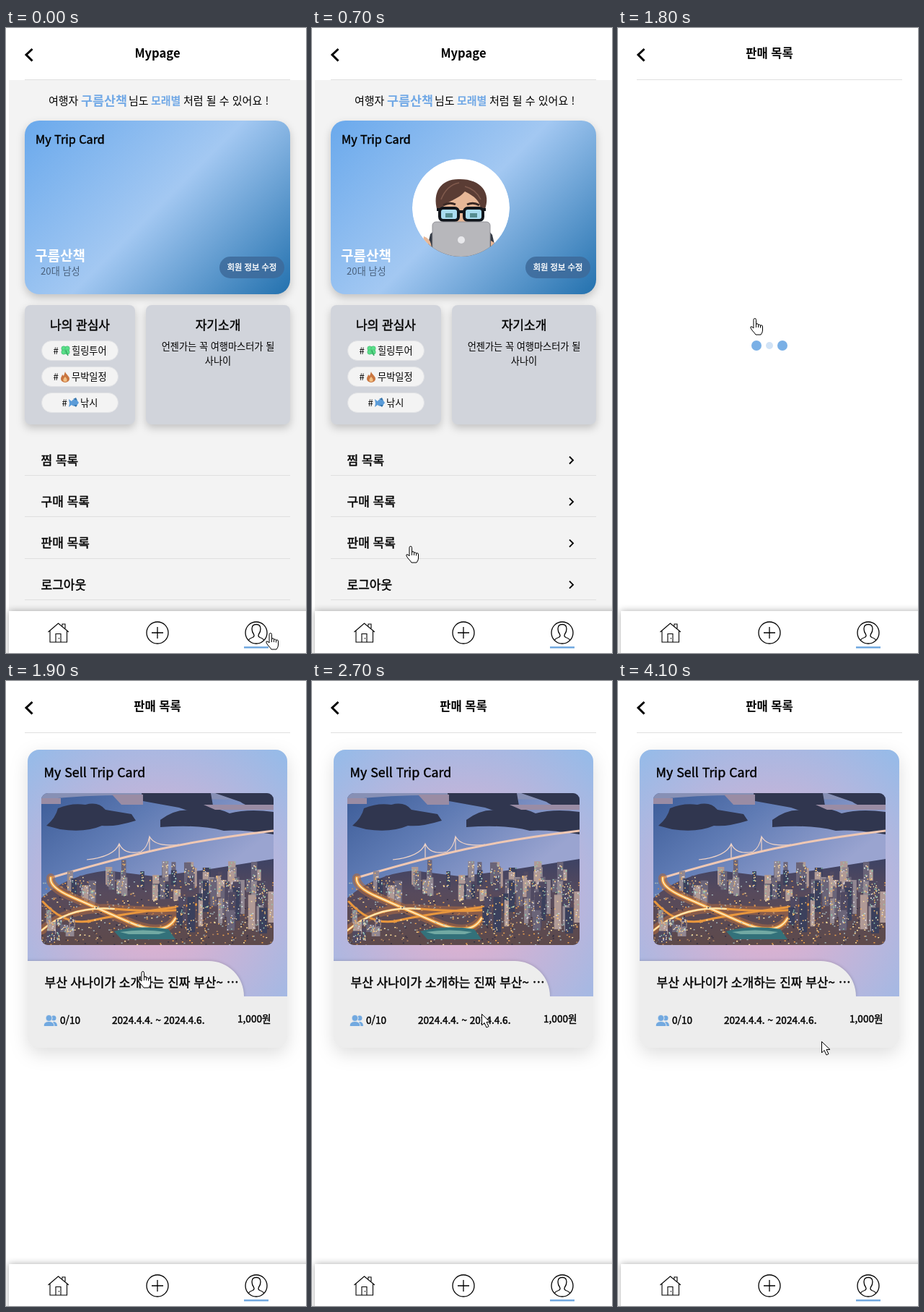
Animation, 416 px wide and 864 px high, one loop 4200 ms. Source, as an HTML page:

```html
<!DOCTYPE html>
<html lang="ko">
<head>
<meta charset="utf-8">
<title>Mypage</title>
<style>
html, body { margin: 0; height: 100%; overflow: hidden; background: #fff; }
svg { display: block; width: 416px; height: 864px; }
text { font: 400 17px "Noto Sans CJK KR", "Noto Sans KR", "Noto Sans CJK JP", sans-serif; }
.mid { text-anchor: middle; }
.medium { stroke: #000; stroke-width: .45px; }
.s13 { font-size: 13.2px; }
.s14 { font-size: 13.6px; }
.s15 { font-size: 15px; }
.blue { fill: #72a9e6; font-weight: 700; }
.line { fill: none; stroke: #000; stroke-width: 1.3; }
.shadow { filter: drop-shadow(0 5px 6px #0003); }
.soft { filter: drop-shadow(0 8px 12px #0002); }
.thin { stroke: #dfdfdf; }
</style>
</head>
<body>
<svg viewBox="0 0 416 864">
  <defs>
    <linearGradient id="trip" gradientUnits="userSpaceOnUse" x1="58" y1="96" x2="362" y2="400">
      <stop stop-color="#6aa9ec"/><stop offset=".5" stop-color="#a3c8f2"/><stop offset="1" stop-color="#2371ae"/>
    </linearGradient>
    <radialGradient id="sell" gradientUnits="userSpaceOnUse" cx="210" cy="301" r="273">
      <stop stop-color="#eeaeca"/><stop offset="1" stop-color="#94bbe9"/>
    </radialGradient>
    <linearGradient id="sea" x2=".7" y2=".6">
      <stop stop-color="#3c5c98"/><stop offset=".45" stop-color="#5f7bb4"/><stop offset="1" stop-color="#9aa4d0"/>
    </linearGradient>
    <linearGradient id="land" x2="0" y2="1">
      <stop stop-color="#3d4264"/><stop offset=".4" stop-color="#574a5c"/><stop offset="1" stop-color="#5e4a4b"/>
    </linearGradient>
    <clipPath id="face"><circle cx="206.500" cy="248.500" r="67.500"/></clipPath>
    <clipPath id="photoClip"><rect x="49" y="155" width="322" height="210" rx="9"/></clipPath>
    <clipPath id="cardClip"><rect x="30" y="95" width="360" height="412" rx="16"/></clipPath>
  </defs>

  <g id="mypage">
    <path fill="#f3f3f3" d="M4 72H416V806H4z"/>
    <text class="s15" x="59" y="106">여행자</text>
    <text class="blue" x="104" y="107" style="font-size:17.400px">구름산책</text>
    <text class="s15" x="170" y="106">님도</text>
    <text class="blue" x="201" y="106" style="font-size:15px">모래별</text>
    <text class="s15" x="246" y="106">처럼 될 수 있어요 !</text>

    <rect class="shadow" x="26" y="128" width="368" height="240" rx="20" fill="url(#trip)"/>
    <text class="medium" x="41" y="160" style="font-size:16.200px">My Trip Card</text>
    <text x="40" y="322" fill="#fff" style="font-size:19px;font-weight:700">구름산책</text>
    <text class="s13" x="48" y="341" fill="#4a617c" style="font-weight:300">20대 남성</text>
    <rect x="296" y="316" width="90" height="30" rx="15" fill="#3e6a9a" opacity=".85"/>
    <text class="mid" x="341" y="335" fill="#fff" stroke="#fff" stroke-width=".4" style="font-size:11.300px">회원 정보 수정</text>

    <g class="shadow" fill="#d1d4db">
      <rect x="26" y="383" width="153" height="165" rx="8"/>
      <rect x="194" y="383" width="200" height="165" rx="8"/>
    </g>
    <text class="mid medium" x="102.500" y="417">나의 관심사</text>
    <text class="mid medium" x="294" y="417">자기소개</text>
    <text class="s13 mid" x="294" y="445">언젠가는 꼭 여행마스터가 될</text>
    <text class="s13 mid" x="294" y="465">사나이</text>
    <g id="tags"></g>
    <g fill="#5be08a" stroke="#35a862" stroke-width=".5">
      <circle cx="80" cy="443" r="3.200"/><circle cx="85" cy="443" r="3.200"/>
      <circle cx="80" cy="448" r="3.200"/><circle cx="85" cy="448" r="3.200"/>
      <path fill="none" stroke-width="1.500" d="M83 446l3 7"/>
    </g>
    <path fill="#c9753f" d="M82 475c1 4 6 6 6 10a6 5 0 0 1-12 0c0-3 2-4 2-6l2 2z"/>
    <path fill="#f2bf83" d="M82 482c3 3 4 7 0 7s-3-4 0-7z"/>
    <path fill="#5a9bd8" d="M87 513l4 3c2-4 7-4 10 2-3 5-7 6-10 3l-4 3 1-5z"/>
    <path fill="#3474ac" d="M93 513l4-2 2 4zM94 521l3 3 2-3z"/>
    <g id="rows"></g>

    <g id="loaded">
      <g clip-path="url(#face)">
        <circle cx="206.500" cy="248.500" r="67.500" fill="#fff"/>
        <path fill="#343a45" d="M157 316l7-31q8-9 20-10h46q14 2 20 11l7 30z"/>
        <ellipse cx="207" cy="250" rx="31" ry="30" fill="#e7b797"/>
        <path fill="#5a3c34" d="M174 253c-8-26 5-44 29-44 30-1 47 18 36 44l-5-2c-1-12-8-18-22-25-10 12-25 12-33 25z"/>
        <path fill="none" stroke="#805a4d" stroke-width="1.500" d="M179 237q8-20 25-23M212 219q15 4 22 18"/>
        <path fill="none" stroke="#3b2925" stroke-width="3" d="M182 245q9-5 17-1M215 244q9-4 17 1"/>
        <g fill="#a9dcf0" stroke="#11151b" stroke-width="4">
          <rect x="177" y="249" width="26" height="17" rx="5"/><rect x="211" y="249" width="26" height="17" rx="5"/>
          <path d="M202 254h9M173 251h4M237 251h4"/>
        </g>
        <path fill="#568d91" d="M185 256h10v6h-10zM219 256h10v6h-10z"/>
        <rect x="167" y="268" width="80" height="54" rx="5" fill="#b7b7bb" stroke="#929298"/>
        <circle cx="207" cy="293" r="5" fill="#e8e8eb"/>
        <path fill="#e7b797" d="M155 288q10 3 11 16l-3 13h-12zM248 294q8 3 8 15l-8 7z"/>
      </g>
      <g id="chevrons" class="line" style="stroke-width:1.900px"></g>
    </g>
  </g>

  <g id="empty">
    <text class="mid" x="210" y="438">판매 목록에 아무것도 없어요..</text>
    <text x="41" y="464">같이 여행을 떠날 동행 메이트를 모집해보세요</text>
    <circle cx="367.500" cy="459" r="9" fill="#efb35e"/>
    <path fill="#fff" stroke="#75452a" d="M361 459h13q-1 7-6.500 7t-6.500-7z"/>
    <path class="line" style="stroke:#75452a" d="M361 456q2-3 4 0M370 456q2-3 4 0M362 462h11"/>
  </g>

  <g id="loader" fill="#7ab0e6"></g>

  <g id="card">
    <rect class="soft" x="30" y="95" width="360" height="412" rx="16" fill="#ededed"/>
    <g clip-path="url(#cardClip)">
      <path fill="url(#sell)" d="M30 95H390V436H30z"/>
      <path fill="#ededed" style="filter:drop-shadow(0 0 2px #0003)" d="M20 387H281A49 49 0 0 1 330 436H20z"/>
      <path fill="#ededed" d="M30 436H390V507H30z"/>
    </g>
    <text class="medium" x="52.500" y="133" style="font-size:17.800px">My Sell Trip Card</text>
    <g id="photo" clip-path="url(#photoClip)">
      <path fill="url(#sea)" d="M49 155H371V365H49z"/>
      <path fill="#8790b5" d="M49 155H371V163Q290 166 220 160T49 164z"/>
      <path fill="#30364f" d="M188 155H284L288 178Q262 184 240 175L190 166zM56 200Q69 189 72 176 91 168 110 171 128 166 138 178L174 184 180 193Q151 202 133 200 110 210 75 205zM214 192Q238 174 262 180 287 171 310 183 336 176 371 181V212Q325 205 302 207 269 198 214 202zM290 155H371V176Q336 176 325 167z"/>
      <path fill="#9a8ca4" d="M49 162H76V170H49zM147 157H190V171H160zM274 171H371V178H290z"/>
      <path fill="none" stroke="#f3d5c6" stroke-width="1.200" d="M112 247Q150 243 157 225 164 241 187 236 196 231 199 215 207 230 240 226M157 225v19M199 215v20"/>
      <path fill="none" stroke="#efc8b4" stroke-width="3" d="M371 207Q280 218 215 232T62 272"/>
      <path fill="url(#land)" d="M49 300Q85 268 140 262L205 270 270 262 371 246V365H49z"/>
      <g id="far"></g>
      <g fill="none" stroke="#e9973d" stroke-linecap="round">
        <path stroke="#a96a45" stroke-width="12" opacity=".6" d="M62 272Q60 285 90 298T170 333 235 328M49 345Q90 310 150 315T244 316"/>
        <path stroke-width="5" d="M62 272Q60 285 90 298T170 333 235 328"/>
        <path stroke-width="3" d="M49 345Q90 310 150 315T244 316M51 305Q83 340 120 331T280 307"/>
        <path stroke="#ffe6b0" stroke-width="2" d="M62 272Q60 285 90 298T170 333 235 328M49 345Q90 310 150 315"/>
      </g>
      <g id="near"></g>
      <path fill="#33717a" d="M150 346Q185 337 225 343L235 357H160z"/>
      <path fill="#72a9a3" d="M158 347Q190 342 222 347L212 350H170z"/>
    </g>
    <text class="medium" x="53.500" y="422.500">부산 사나이가 소개하는 진짜 부산~ ⋯</text>
    <g fill="#72a9e0">
      <circle cx="66" cy="466" r="3.500"/><path d="M64 477q-1-6 3-6 4 1 4 6z"/>
      <g stroke="#ededed"><circle cx="59.500" cy="466" r="4.500"/><path d="M52 477.500q0-7 7.500-7t7.500 7z"/></g>
    </g>
    <text class="s14 medium" x="75" y="474">0/10</text>
    <text class="s14 medium" x="147" y="474">2024.4.4. ~ 2024.4.6.</text>
    <text class="s14 medium" x="321" y="472">1,000원</text>
  </g>

  <path class="thin" d="M26 71.500H394"/>
  <path class="line" style="stroke-width:3px" d="M36.500 29L28 37l8.500 8.500"/>
  <text id="title" class="mid" x="210" y="40.500" style="font-size:16.600px;font-weight:700"></text>
  <path fill="#fff" style="filter:drop-shadow(0 0 5px #0005)" d="M4 806H430V880H4z"/>
  <g class="line">
    <path stroke-width="1.100" d="M58.500 835L72.500 823l14.500 12M61 833v16H84.500V833M78 826.500v-2.500h4v6M69 849V837.500h7V849M73.500 843v1.500"/>
    <circle cx="210" cy="836" r="15"/><path d="M202 836h16M210 828v16"/>
    <circle cx="347" cy="836" r="15"/>
    <path d="M336.500 846.500Q337 844 342 842.500 345 841 343.500 838 341 835 341 830.500 341 824.500 347 824.500T353 830.500Q353 835 350.500 838 349 841 352 842.500 357 844 357.500 846.500"/>
  </g>
  <path fill="#72a9e0" d="M330 855H364V857.500H330z"/>

  <g id="cursor" fill="#fff" stroke="#000" stroke-linejoin="round">
    <path id="arrow" d="M.5.500V16l3.500-3.500 3 6.500 3-1.500-3-6H12z"/>
    <path id="hand" d="M5 14V2.500Q5 .5 6.700.5T8.500 2.500V9Q9 7 11 8L11.500 9.500Q13 8 14.500 10 17.500 9 17.500 12V17Q17.500 20 15 23H8Q6 20 3 17 0 13 1 12 3 11 5 14zM8.500 9v4M11.500 9.500v3.500M14.500 10v3.500"/>
  </g>
</svg>
<script>
const $ = id => document.getElementById(id);
const show = (id, on) => $(id).style.display = on ? "" : "none";

$("tags").innerHTML = ["힐링투어", "무박일정", "낚시"].map((tag, i) => {
  const y = 432 + 36 * i, shift = i == 2 ? 12 : 0;
  return `<rect x="49.500" y="${y + .5}" width="106" height="27" rx="13.500" fill="#f3f3f3" stroke="#e2e3e6"/>
    <text class="s13" x="${65.5 + shift}" y="${y + 19}">#</text>
    <text class="s13" x="${91 + shift}" y="${y + 19}">${tag}</text>`;
}).join("");

["찜 목록", "구매 목록", "판매 목록", "로그아웃"].forEach((label, i) => {
  const y = 597.5 + 57.4 * i;
  $("rows").innerHTML += `<text class="medium" x="48.500" y="${y + 6}">${label}</text>
    <path class="thin" d="M26 ${Math.floor(y + 21) + .5}H394"/>`;
  $("chevrons").innerHTML += `<path d="M357 ${y - 5}l5 5-5 5"/>`;
});

$("loader").innerHTML = [192, 210, 228].map(x => `<circle cx="${x}" cy="439"/>`).join("");

// Night skyline: seeded towers with a few lit windows
let seed = 7;
const random = () => (seed = seed * 16807 % 2147483647) / 2147483647;
const pick = list => list[Math.floor(random() * list.length)];
const block = (x, y, w, h, fill) => `<path fill="${fill}" d="M${x} ${y}h${w}v${h}h${-w}z"/>`;
const walls = ["#3b405c", "#6a6478", "#918791", "#504a62", "#b09a96"];
const lamps = ["#ffe2a4", "#f9b860", "#e6e6ee", "#8fcbb0"];

function skyline(count, left, right, top, bottom, height) {
  let out = "";
  for (let i = 0; i < count; i++) {
    const x = left + random() * (right - left), w = 5 + random() * 7;
    const base = top + (bottom - top) * i / count, h = height * (.5 + random() * .7);
    out += block(x, base - h, w, h, pick(walls));
    for (let n = 0; n < 12; n++)
      out += block(x + random() * (w - 1.5), base - random() * h, 1.5, 1.5, pick(lamps));
  }
  return out;
}
function lights(count, left, right, top) {
  let out = "";
  for (let i = 0; i < count; i++)
    out += block(left + random() * (right - left), top + random() * (365 - top), 2, 1.5, pick(["#f0a34c", "#ffdf9a", "#b98860", "#9fb0b4", "#332f42"]));
  return out;
}
$("far").innerHTML = lights(450, 49, 371, 275) + skyline(45, 138, 365, 274, 305, 26) + skyline(8, 84, 118, 290, 312, 32);
$("near").innerHTML = lights(120, 49, 371, 300) + skyline(30, 235, 365, 310, 350, 42) + skyline(10, 49, 100, 335, 365, 16);

// Pointer stops: time, x, y, hand?
const stops = [
  [0, 360, 836, 1], [600, 130, 716, 1], [800, 130, 716, 1], [900, 129, 715, 0], [1200, 129, 715, 0],
  [1700, 183, 401, 1], [1900, 183, 401, 1], [2000, 220, 379, 0], [2400, 220, 379, 0], [2600, 194, 335, 0],
  [2900, 351, 818, 1], [3000, 351, 818, 1], [3200, 280, 481, 0], [3400, 285, 498, 0], [4000, 285, 498, 0],
  [4100, 282, 498, 0], [4200, 282, 498, 0]
];

function draw(now) {
  const t = Math.floor(now % 4200 / 100) * 100;
  const mypage = t < 900;
  show("mypage", mypage);
  show("loaded", t >= 100);
  show("empty", t >= 900 && t < 1200);
  show("loader", t >= 1200 && t < 1900);
  show("card", t >= 1900);
  $("title").textContent = mypage ? "Mypage" : "판매 목록";

  [...$("loader").children].forEach((dot, i) => {
    const pulse = (1 + Math.cos((t - 1800) / 400 * Math.PI + (i == 1 ? Math.PI : 0))) / 2;
    dot.setAttribute("r", 5 + 2 * pulse);
    dot.setAttribute("opacity", .35 + .65 * pulse);
  });

  const i = stops.findIndex(stop => stop[0] > t);
  const [t0, x0, y0, hand] = stops[i - 1], [t1, x1, y1] = stops[i];
  const k = (t - t0) / (t1 - t0), ease = k * k * (3 - 2 * k);
  $("cursor").setAttribute("transform", `translate(${Math.round(x0 + (x1 - x0) * ease)} ${Math.round(y0 + (y1 - y0) * ease)})`);
  show("hand", hand);
  show("arrow", !hand);
}

const start = performance.now();
function tick() {
  draw(performance.now() - start);
  requestAnimationFrame(tick);
}
tick();
</script>
</body>
</html>
```
